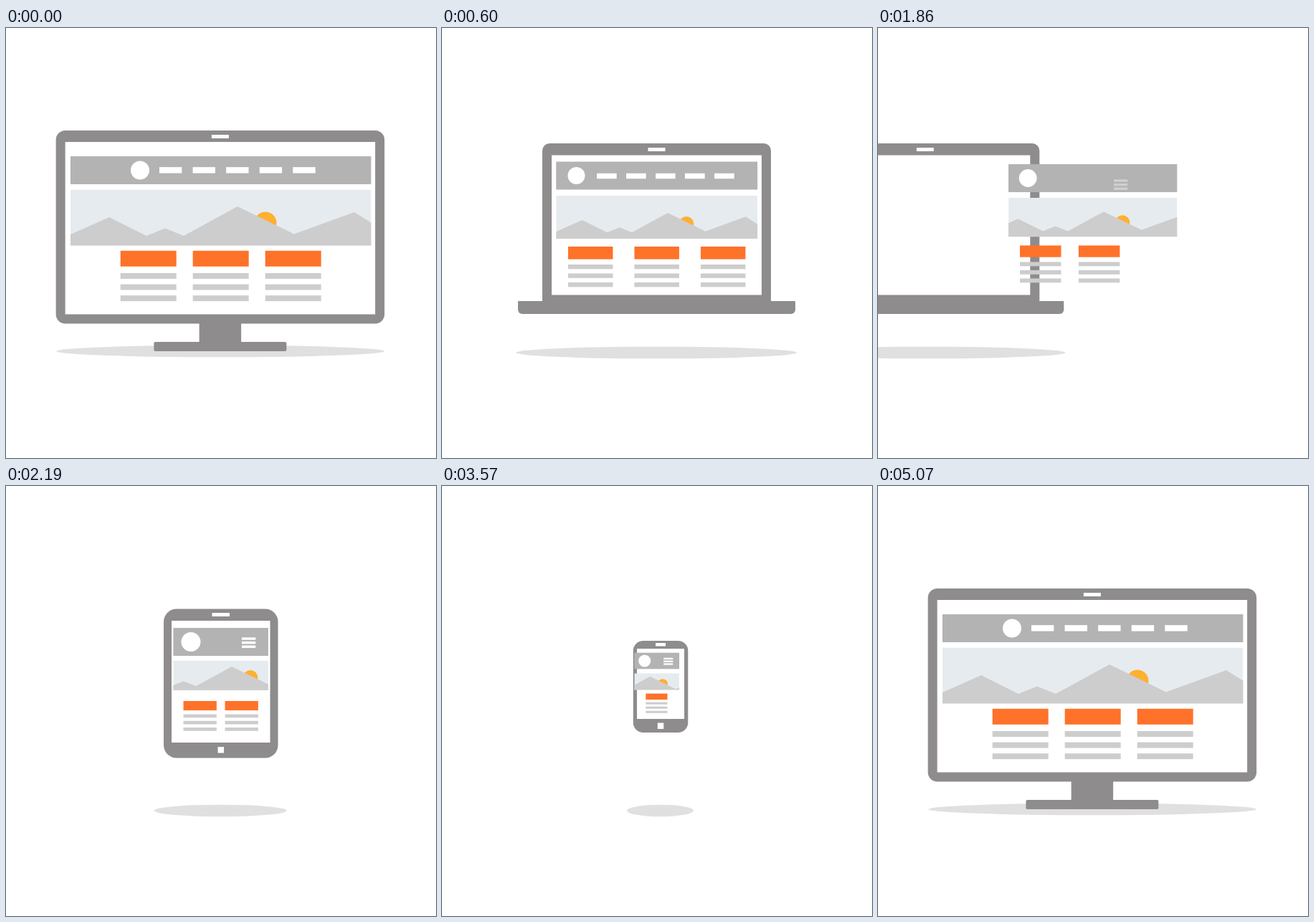
Recreate the animation shown at these times as an HTML page with a canvas. Size 600 px wide and 600 px high, loop 5.91 s.

```html
<!DOCTYPE html>
<html lang="en">
<head>
<meta charset="utf-8">
<title>Responsive page</title>
<style>
html, body { margin: 0; width: 100%; height: 100%; overflow: hidden; background: #fff; }
canvas { display: block; width: 600px; height: 600px; }
</style>
</head>
<body>
<canvas id="stage" width="600" height="600"></canvas>
<script>
const ctx = document.getElementById('stage').getContext('2d');
const LOOP = 5910, FADE_OUT = 300, FADE_IN = 250;
const GRAY = '#8e8c8c', WHITE = '#fff', LINE = '#cdcdcd';
const CENTER = 299.7;

// Bars and columns are lists of [x, y, width], placed around a centre
const dashes = (cx, cy, step) => Array.from({ length: 5 },
  (_, i) => [cx + (i - 2.34) * step, cy - step * 0.09, step * 0.674]);
const burger = (x, cy, w) => Array.from({ length: 3 },
  (_, i) => [x, cy + (i * 0.29 - 0.32) * w, w]);
const columns = (n, y, w, step) => Array.from({ length: n },
  (_, i) => [CENTER + (i - (n - 1) / 2) * step - w / 2, y, w]);

// body: centred boxes as [y, width, height, radius, colour]
const devices = [
  { // monitor
    x: 298.9, shadow: [451, 229],
    body: [
      [410, 58.5, 30, 0, GRAY], [438, 185, 13, 2, GRAY],
      [143, 458.5, 269.5, 13, GRAY], [159, 432.5, 240.5, 0, WHITE], [149, 24, 5, 0, WHITE]
    ],
    page: { w: 419.5, navY: 179, navH: 39, heroY: 225.5, heroH: 78,
      logoX: 187, logoR: 13, peakX: 323, peakY: 249, zoom: 1 },
    menu: dashes(323, 198.3, 46.6), cols: columns(3, 310.8, 78, 101)
  },
  { // laptop
    x: 299.5, shadow: [453, 196],
    body: [
      [161, 319, 225, [10, 10, 0, 0], GRAY], [381, 387, 18, [1, 1, 6, 6], GRAY],
      [177.5, 293, 195, 0, WHITE], [167, 24, 5, 0, WHITE]
    ],
    page: { w: 281, navY: 186.5, navH: 39, heroY: 234, heroH: 60,
      logoX: 187.5, logoR: 12, peakX: 315, peakY: 258, zoom: 0.667 },
    menu: dashes(312, 206.5, 41), cols: columns(3, 305, 62.5, 92.5)
  },
  { // tablet
    x: 299.8, shadow: [453, 92.5],
    body: [
      [171.5, 159.5, 208, 18, GRAY], [188, 137.5, 170, 0, WHITE],
      [177, 24.5, 5, 0, WHITE], [364, 8.5, 8.5, 0, WHITE]
    ],
    page: { w: 132.5, navY: 198, navH: 39, heroY: 243.5, heroH: 41.5,
      logoX: 258, logoR: 13.5, peakX: 315, peakY: 252, zoom: 0.667 },
    menu: burger(329, 217.5, 19.3), cols: columns(2, 300, 46.3, 58)
  },
  { // phone
    x: 299.8, shadow: [453, 46.5],
    body: [
      [216, 76.5, 128, 14, GRAY], [227, 66, 98, 0, WHITE],
      [219, 14, 4.5, 0, WHITE], [330.5, 8.5, 8.5, 0, WHITE]
    ],
    page: { w: 62, navY: 233, navH: 22.5, heroY: 261.5, heroH: 23,
      logoX: 283, logoR: 8.5, peakX: 290, peakY: 266, zoom: 0.45 },
    menu: burger(309, 244.2, 13), cols: columns(1, 289.5, 30, 0)
  }
];

// tail: share of the motion left for a slow settling at the end
const moves = [
  { start: 30, time: 570, tail: 0 },
  { start: 1470, time: 600, tail: 0.012 },
  { start: 3000, time: 600, tail: 0 },
  { start: 4500, time: 570, tail: 0 }
];

// Skyline relative to the main peak
const hills = [[-260, 51], [-179, 15], [-127, 41], [-101, 30.5], [-75, 41],
  [0, 0], [79, 38.5], [163, 8], [230, 50]];

const clamp = v => Math.max(0, Math.min(1, v));
const mix = (a, b, p) => a + (b - a) * p;
const travel = device => 430 + 1.68 * device.shadow[1];

// Late, steep ease-in-out: cubic-bezier(.95, 0, .7, 1)
function ease(u) {
  let lo = 0, hi = 1;
  for (let i = 0; i < 24; i++) {
    const s = (lo + hi) / 2, r = 1 - s;
    if (2.85 * r * r * s + 2.1 * r * s * s + s * s * s < u) lo = s; else hi = s;
  }
  return lo * lo * (3 - 2 * lo);
}

function rect(x, y, w, h, color) {
  ctx.fillStyle = color;
  ctx.fillRect(x, y, w, h);
}

function oval(x, y, rx, ry, color) {
  ctx.fillStyle = color;
  ctx.beginPath();
  ctx.ellipse(x, y, rx, ry, 0, 0, 7);
  ctx.fill();
}

function drawDevice({ x, shadow: [y, rx], body }, dx) {
  oval(299.2 + dx, y, rx, 8.3, '#e0e0e0');
  for (const [top, w, h, r, color] of body) {
    ctx.fillStyle = color;
    ctx.beginPath();
    ctx.roundRect(x + dx - w / 2, top, w, h, r);
    ctx.fill();
  }
}

function drawHero({ w, heroY, heroH, peakX, peakY, zoom }) {
  const left = CENTER - w / 2;
  ctx.save();
  ctx.beginPath();
  ctx.rect(left, heroY, w, heroH);
  ctx.clip();
  rect(left, heroY, w, heroH, '#e6ebef');
  ctx.translate(peakX, peakY);
  ctx.scale(zoom, zoom);
  oval(39, 23, 15.5, 15.5, '#ffb030');
  ctx.fillStyle = LINE;
  ctx.beginPath();
  ctx.moveTo(-260, 100);
  for (const point of hills) ctx.lineTo(...point);
  ctx.lineTo(230, 100);
  ctx.fill();
  ctx.restore();
}

const drawDash = ([x, y, w]) => rect(x, y, w, w * 0.27, WHITE);
const drawStripe = ([x, y, w]) => rect(x, y, w, w * 0.177, WHITE);

function drawColumn([x, y, w]) {
  rect(x, y, w, w * 0.282, '#ff722a');
  for (let i = 0; i < 3; i++) rect(x, y + w * (0.4 + 0.2 * i), w, w * 0.102, LINE);
}

// The first `shared` items move; the others fade out and in
function drawItems(from, to, shared, p, ms, drawFrom, drawTo = drawFrom) {
  for (let i = 0; i < shared; i++) drawFrom(from[i].map((v, k) => mix(v, to[i][k], p)));
  ctx.globalAlpha = clamp(1 - ms / FADE_OUT);
  from.slice(shared).forEach(drawFrom);
  ctx.globalAlpha = clamp((ms - FADE_OUT) / FADE_IN);
  to.slice(shared).forEach(drawTo);
  ctx.globalAlpha = 1;
}

function drawPage(a, b, p, ms) {
  const page = {};
  for (const key in a.page) page[key] = mix(a.page[key], b.page[key], p);
  const { w, navY, navH, logoX, logoR } = page;
  const barStyle = device => device.menu.length === 5 ? drawDash : drawStripe;
  const sameMenu = a.menu.length === b.menu.length;
  rect(CENTER - w / 2, navY, w, navH, '#b3b3b3');
  oval(logoX, navY + navH / 2, logoR, logoR, WHITE);
  drawItems(a.menu, b.menu, sameMenu ? a.menu.length : 0, p, ms, barStyle(a), barStyle(b));
  drawHero(page);
  drawItems(a.cols, b.cols, a.cols.length < b.cols.length ? 0 : b.cols.length, p, ms, drawColumn);
}

function draw(t) {
  const n = moves.findLastIndex((move, i) => i === 0 || t >= move.start);
  const { start, time, tail } = moves[n];
  const ms = Math.max(0, t - start);
  const settle = 1 - (1 - clamp((ms - time) / 120)) ** 2;
  const p = mix(ease(clamp(ms / time)), settle, tail);
  const a = devices[n], b = devices[(n + 1) % devices.length];
  ctx.clearRect(0, 0, 600, 600);
  drawDevice(a, -travel(a) * p);
  drawDevice(b, travel(b) * (1 - p));
  drawPage(a, b, p, ms);
}

const begin = performance.now();
function frame() {
  draw((performance.now() - begin) % LOOP);
  requestAnimationFrame(frame);
}
frame();
</script>
</body>
</html>
```
